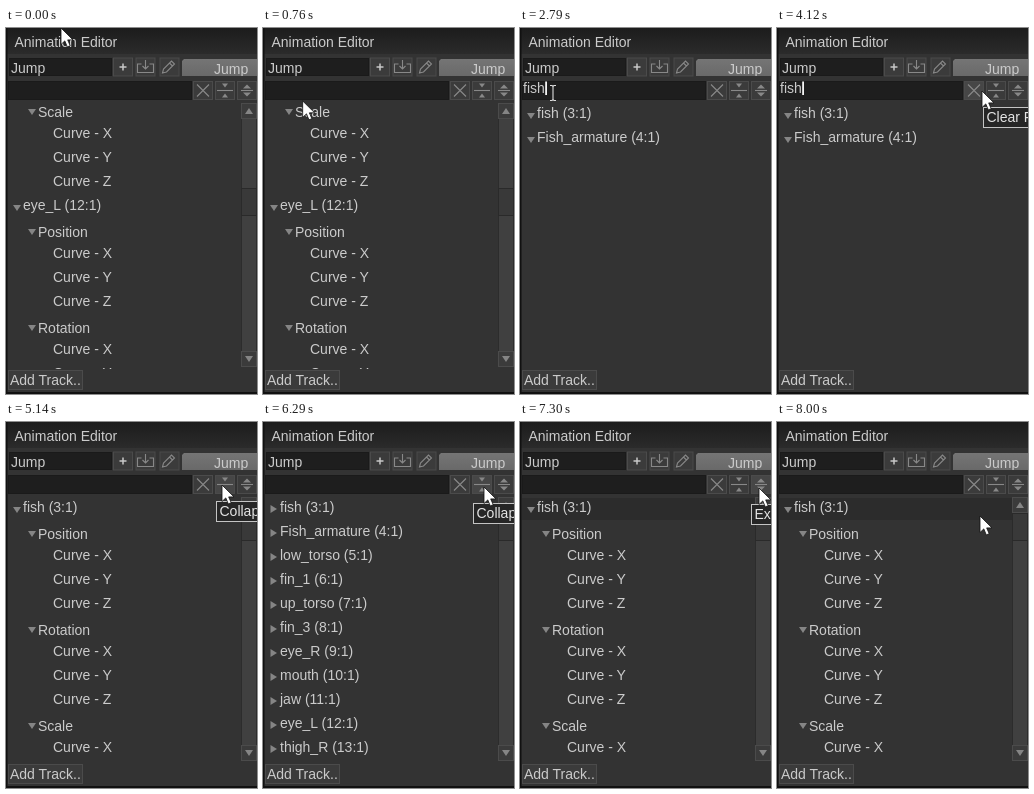
Animation of 251 by 366 pixels, one loop 9320 ms. Source, as an HTML page:

```html
<!DOCTYPE html>
<html lang="en">
<head>
<meta charset="utf-8">
<title>Animation Editor</title>
<style>
html, body { margin: 0; width: 100%; height: 100%; overflow: hidden; background: #333; }
svg { display: block; width: 251px; height: 366px; }
text { font: 14px "Liberation Sans", Arial, sans-serif; fill: #cbcbcb; white-space: pre; }
.field { fill: #1e1e1e; stroke: #1a1a1a; }
.btn { fill: #3b3b3b; stroke: #4b4b4b; }
.hot .btn { fill: #464646; }
.icon { fill: none; stroke: #888; stroke-width: 1.1; }
.solid { fill: #888; }
.tri { fill: #858585; }
</style>
</head>
<body>
<svg viewBox="0 0 251 366">
  <defs>
    <linearGradient id="bar" x2="0" y2="1"><stop stop-color="#1c1c1c"/><stop offset="1" stop-color="#2b2b2b"/></linearGradient>
    <linearGradient id="tab" x2="0" y2="1"><stop stop-color="#757575"/><stop offset="1" stop-color="#696969"/></linearGradient>
    <clipPath id="listClip"><rect x="2" y="75" width="233" height="266"/></clipPath>
    <clipPath id="tabClip"><rect x="176" y="30" width="75" height="18"/></clipPath>
  </defs>
  <rect width="251" height="366" fill="#333"/>
  <rect width="251" height="26" fill="url(#bar)"/>
  <text x="8.500" y="19">Animation Editor</text>

  <rect class="field" x="3.500" y="30.500" width="102" height="17"/>
  <text x="5" y="45">Jump</text>
  <g id="tools"></g>
  <g clip-path="url(#tabClip)">
    <path d="M178 31h73v17h-75V33z" fill="url(#tab)"/>
    <text x="208" y="46">Jump</text>
  </g>

  <rect class="field" x="2.500" y="53.500" width="183" height="18"/>
  <text id="query" x="3" y="65"></text>
  <rect id="caret" y="53.500" width="1.800" height="13.500" fill="#f4f4f4"/>

  <rect id="focus" x="2" y="76" width="233" height="22" fill="#2c2c2c"/>
  <g id="list" clip-path="url(#listClip)"></g>
  <g id="scroll">
    <rect x="235.500" y="75.500" width="15" height="263" fill="#404040" stroke="#2c2c2c"/>
    <rect class="btn" x="235.500" y="75.500" width="15" height="15"/>
    <rect class="btn" x="235.500" y="323.500" width="15" height="15"/>
    <path class="tri" d="M239 86h8l-4-6zM239 328h8l-4 6z"/>
    <rect id="thumb" x="235.500" width="15" height="27" fill="#393939" stroke="#2a2a2a"/>
  </g>

  <rect class="btn" x="2.500" y="342.500" width="74" height="19"/>
  <text x="4" y="357">Add Track..</text>
  <path d="M0 0h1.500v364H251v2H0z" fill="#111"/>

  <g id="tip">
    <rect y=".5" width="100" height="20" fill="#262626" stroke="#c4c4c4"/>
    <text x="3" y="14.500" style="fill:#e4e4e4"></text>
  </g>
  <path id="arrow" d="M0 0v16.500l3.800-3.600 2.500 6 2.900-1.200-2.500-5.800h5.300z" fill="#fff" stroke="#111" stroke-width=".8"/>
  <path id="beam" d="M-3-7.500h2l1 1 1-1h2M0-6.500v13M-3 7.500h2l1-1 1 1h2" fill="none" stroke="#ddd" stroke-width="1.100"/>
</svg>
<script>
const LOOP = 9320, STEP = 75, ROW = 24, SCROLLED = 2716;
const TYPE = 1170, KEY_GAP = 210, FOCUS = 920, CLEAR = 4420, FOLD = 6290, UNFOLD = 7220;
const $ = id => document.getElementById(id);

const tracks = ["fish (3:1)", "Fish_armature (4:1)", "low_torso (5:1)", "fin_1 (6:1)", "up_torso (7:1)",
  "fin_3 (8:1)", "eye_R (9:1)", "mouth (10:1)", "jaw (11:1)", "eye_L (12:1)", "thigh_R (13:1)",
  "fin_2_pivot (21:1)", "fin_2 (26:1)"];

const icon = d => `<path class="icon" d="${d}"/>`;
const solid = d => `<path class="solid" d="${d}"/>`;

// Icons are drawn around the centre of their button.
const tools = [
  { x: 117, y: 39, icon: `<path d="M-3.500 0h7M0-3.500v7" stroke="#c8c8c8" stroke-width="1.500"/>` },
  { x: 139.5, y: 39, icon: icon("M-4-3h-4V5.500H8V-3H4M0-7V2M-3-1L0 2l3-3") },
  { x: 163.5, y: 39, icon: icon("M-7 6l1-4 8-8 3 3-8 8zM0-4l3 3") },
  { x: 197, y: 62.5, icon: icon("M-6-6L6 6M6-6L-6 6"), tip: "Clear Filter", tipX: 206.5 },
  { x: 219, y: 62.5, icon: icon("M-8 0H8") + solid("M-3-7h6l-3 4zM-3 7h6l-3-4z"), tip: "Collapse All", tipX: 210.5 },
  { x: 241, y: 62.5, icon: icon("M-6 0H6") + solid("M-4-2h8l-4-4zM-4 2h8l-4 4z"), tip: "Expand All", tipX: 231.5 }
];
$("tools").innerHTML = tools.map(b => `<g transform="translate(${b.x} ${b.y})">
  <rect class="btn" x="-9.500" y="-9" width="19" height="18"/>${b.icon}</g>`).join("");

const stops = [
  { from: 0, to: 0, x: 55, y: 0 },
  { from: 70, to: 290, x: 53, y: 80 },
  { from: 520, to: 920, x: 33, y: 65 },
  { from: 3110, to: 3260, x: 59, y: 67 },
  { from: 3490, to: 3950, x: 205, y: 63 },
  { from: 4820, to: 4970, x: 216, y: 63 },
  { from: 5670, to: 5750, x: 221, y: 65 },
  { from: 6830, to: 6980, x: 239, y: 66 },
  { from: 7540, to: 8000, x: 203, y: 94 }
];

// The pointer jumps along a slightly sagging arc, one hop per STEP.
function pointer(t) {
  const i = stops.filter(s => s.from <= t).length - 1;
  const b = stops[i], a = stops[Math.max(0, i - 1)];
  const hops = Math.round((b.to - b.from) / STEP) + 1;
  const hop = t >= b.to ? hops : Math.floor((t - b.from) / STEP) + 1;
  const p = Math.min(1, hop / hops), dx = b.x - a.x;
  return [a.x + dx * p, a.y + (b.y - a.y) * p + Math.abs(dx) * 0.17 * Math.sin(Math.PI * p)];
}

const typed = t => t < TYPE || t >= CLEAR ? "" : "fish".slice(0, Math.floor((t - TYPE) / KEY_GAP) + 1);

function caretOn(t) {
  if (t < FOCUS || t >= CLEAR) return false;
  return t < 1850 || Math.floor((t - 1850) / 470) % 2 === 0;
}

function viewAt(t) {
  if (t < TYPE) return "scrolled";
  if (t < CLEAR) return "filter";
  return t >= FOLD && t < UNFOLD ? "closed" : "open";
}

const show = (el, on) => el.setAttribute("visibility", on ? "visible" : "hidden");
const place = (el, x, y) => el.setAttribute("transform", `translate(${x} ${y})`);
const label = (x, y, s) => `<text x="${x}" y="${y}">${s}</text>`;
const down = (x, y) => `<path class="tri" d="M${x} ${y - 3}h8l-4 6z"/>`;
const right = (x, y) => `<path class="tri" d="M${x} ${y - 4}l6.500 4-6.500 4z"/>`;

function rowsOf(view, query) {
  const rows = [];
  for (const name of tracks.filter(s => s.toLowerCase().includes(query))) {
    rows.push(y => (view === "closed" ? right(7.5, y - 3) : down(7, y - 2)) + label(17, y, name));
    if (view === "filter" || view === "closed") continue;
    for (const group of ["Position", "Rotation", "Scale"]) {
      rows.push(y => down(22, y - 2) + label(32, y + 3, group));
      for (const axis of "XYZ") rows.push(y => label(47, y, "Curve - " + axis));
    }
  }
  return rows;
}

let drawn = "";
function drawList(view, query) {
  if (drawn === view + query) return;
  drawn = view + query;
  const scrolled = view === "scrolled";
  $("list").innerHTML = rowsOf(view, query).map((row, i) => {
    const y = 90 + i * ROW - (scrolled ? SCROLLED : 0);
    return y > 70 && y < 360 ? row(y) : "";
  }).join("");
  show($("scroll"), view !== "filter");
  $("thumb").setAttribute("y", scrolled ? 160.5 : 91.5);
}

function draw(t) {
  const query = typed(t), [x, y] = pointer(t);
  drawList(viewAt(t), query);
  show($("focus"), t >= UNFOLD);

  $("query").textContent = query;
  $("caret").setAttribute("x", 3.4 + (query ? $("query").getComputedTextLength() : 0));
  show($("caret"), caretOn(t));

  const inBar = y > 53 && y < 72, inField = inBar && x < 186;
  for (const [id, on] of [["beam", inField], ["arrow", !inField]]) {
    place($(id), x, y);
    show($(id), on);
  }

  const hot = tools.find(b => b.tip && inBar && Math.abs(x - b.x) < 11);
  tools.forEach((b, i) => $("tools").children[i].classList.toggle("hot", b === hot));
  show($("tip"), hot);
  if (hot) {
    place($("tip"), hot.tipX, y + 16);
    $("tip").lastElementChild.textContent = hot.tip;
  }
}

const began = performance.now();
function tick() {
  draw((performance.now() - began) % LOOP);
  requestAnimationFrame(tick);
}
tick();
</script>
</body>
</html>
```
